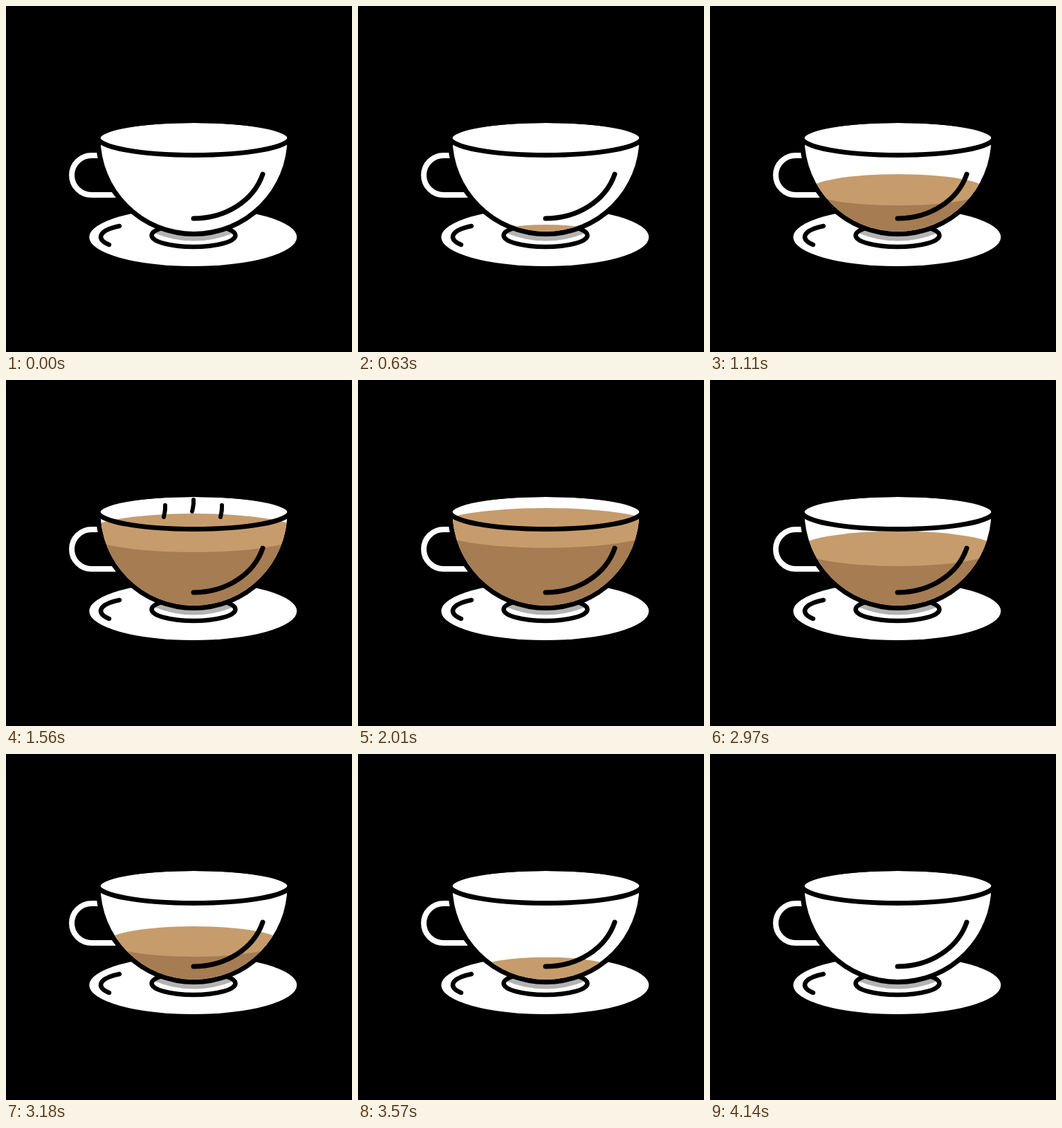
Recreate the animation shown at these times as an HTML page. Size 500x500 px, loop 4530 ms.

```html
<!DOCTYPE html>
<html lang="en">
<head>
<meta charset="utf-8">
<title>Filling cup</title>
<style>
  html, body { margin: 0; height: 100%; overflow: hidden; background: #000; }
  svg { display: block; width: 100vw; height: 100vh; }
  .line { fill: none; stroke: #000; stroke-width: 7; stroke-linecap: round; }
</style>
</head>
<body>
<svg viewBox="0 0 500 500">
  <defs>
    <path id="body" d="M136.5 190.5A135 21.5 0 0 1 406.5 190.5A135 135.5 0 0 1 136.5 190.5Z"/>
    <clipPath id="inside"><use href="#body"/></clipPath>
    <clipPath id="foot"><ellipse cx="271" cy="331.5" rx="60" ry="16.5"/></clipPath>
    <path id="wisp" d="M228 198C229 192 230.5 190 230 181C230 173 227 168 228 158"/>
  </defs>

  <path d="M136 216H123.5A28.5 28.5 0 0 0 123.5 273H162" fill="none" stroke="#fff" stroke-width="8"/>

  <!-- saucer and foot -->
  <ellipse cx="270.3" cy="334" rx="150" ry="42" fill="#fff"/>
  <path class="line" d="M164 318C134 324 129 337 149 345" style="stroke-width:6.5"/>
  <circle cx="271.5" cy="191" r="148.5" fill="#b3b3b3" clip-path="url(#foot)"/>
  <ellipse class="line" cx="271" cy="331.5" rx="60.5" ry="16.5" style="stroke-width:6.5"/>

  <!-- bowl -->
  <use href="#body" stroke="#000" stroke-width="14"/>
  <use href="#body" fill="#fff"/>
  <g clip-path="url(#inside)">
    <rect id="depth" x="130" width="283" height="200" fill="#a67c52"/>
    <ellipse id="surface" cx="271.5" fill="#c69c6d"/>
  </g>
  <ellipse class="line" cx="271.5" cy="190.5" rx="138.5" ry="25"/>
  <path class="line" d="M271 307C318 307 358 281 371 243"/>

  <g id="steam" class="line" style="stroke-width:6">
    <use href="#wisp"/>
    <use href="#wisp" x="41" y="-8"/>
    <use href="#wisp" x="82"/>
  </g>
</svg>
<script>
  const LOOP = 4530, STEP = 30;
  const [depth, surface, steam] = ['depth', 'surface', 'steam'].map(id => document.getElementById(id));

  // [time, y of the liquid's top edge]
  const levels = [
    [0, 327], [360, 327], [390, 325], [630, 316], [900, 287], [1110, 243], [1440, 199],
    [1560, 193], [2000, 185], [2580, 183], [2700, 183], [2730, 183.5], [2820, 195],
    [3000, 223], [3180, 249], [3240, 257], [3780, 311], [4140, 327], [LOOP, 327]
  ];

  const slope = i => levels[i + 1]
    ? (levels[i + 1][1] - levels[i][1]) / (levels[i + 1][0] - levels[i][0]) : 0;

  // Harmonic mean of neighbouring slopes keeps the curve free of overshoot.
  function tangent(i) {
    if (i === 0) return 0;
    const a = slope(i - 1), b = slope(i);
    return a * b > 0 ? 2 * a * b / (a + b) : 0;
  }

  function levelAt(t) {
    const i = levels.findIndex(([end]) => end > t) - 1;
    const [t0, y0] = levels[i], [t1, y1] = levels[i + 1];
    const d = t1 - t0, u = (t - t0) / d, v = 1 - u;
    return y0 * v * v * (1 + 2 * u) + y1 * u * u * (3 - 2 * u)
      + d * u * v * (tangent(i) * v - tangent(i + 1) * u);
  }

  const ramp = (t, from, to) => Math.min(1, Math.max(0, (t - from) / (to - from)));

  function draw(t) {
    // The surface widens as it rises.
    const top = levelAt(t), cy = (top + 54) / 1.118, ry = cy - top;
    depth.setAttribute('y', cy);
    surface.setAttribute('cy', cy);
    surface.setAttribute('ry', ry);
    surface.setAttribute('rx', ry * 5.65);

    const head = 42 * ramp(t, 1455, 1710), tail = 48 * ramp(t, 1620, 1920);
    steam.style.visibility = head > 0 && tail < 48 ? 'visible' : 'hidden';
    steam.style.strokeDasharray = `${Math.max(0, head - tail)} 99`;
    steam.style.strokeDashoffset = -tail;
  }

  function tick() {
    const t = performance.now() % LOOP;
    draw(Math.floor(t / STEP) * STEP);
    requestAnimationFrame(tick);
  }
  tick();
</script>
</body>
</html>
```
